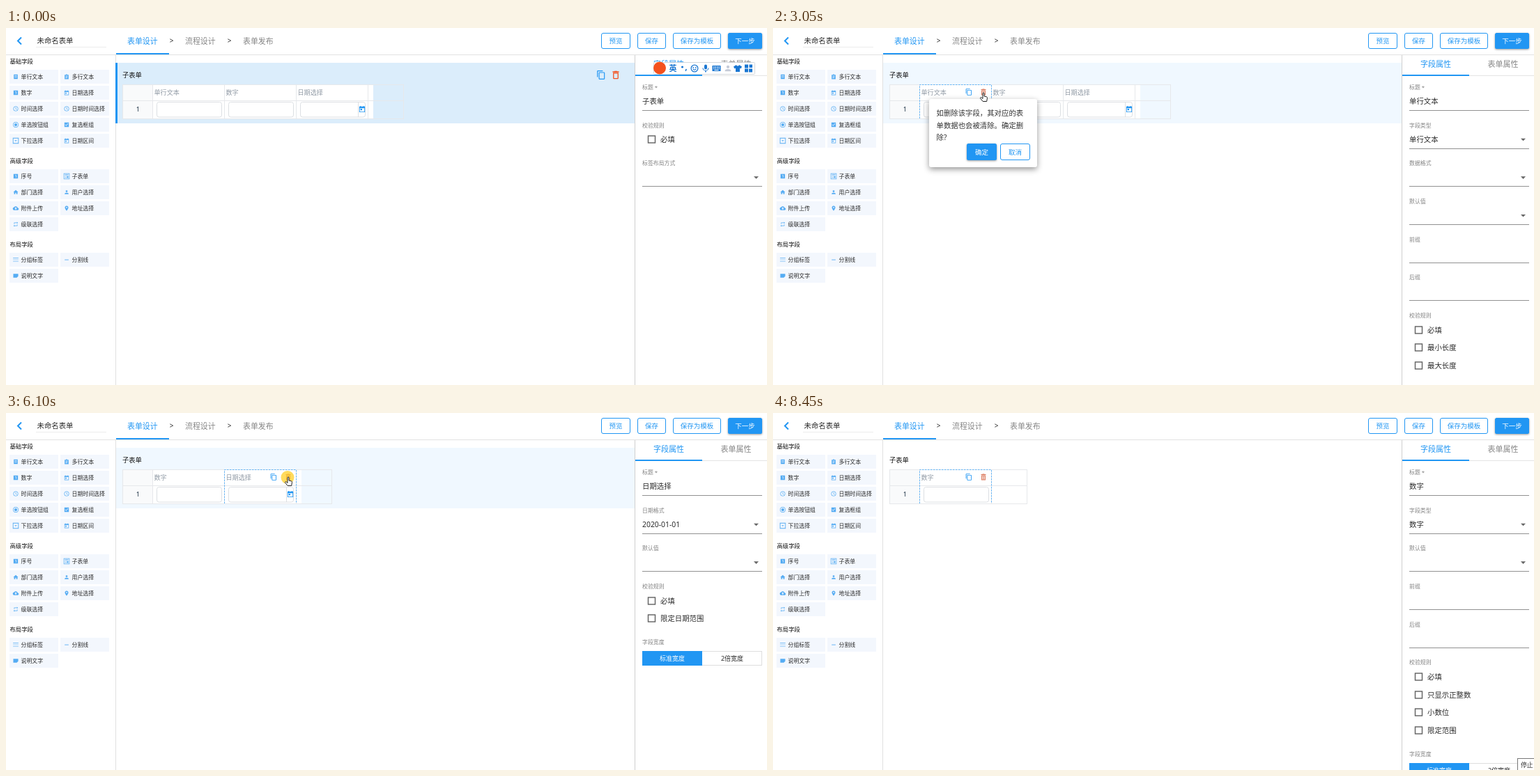
An HTML page with a canvas for the animation above (8580 ms loop, 1092 by 513 pixels).

```html
<!DOCTYPE html>
<html lang="zh-CN">
<head>
<meta charset="utf-8">
<title>表单设计</title>
<style>
html, body { margin: 0; width: 100%; height: 100%; overflow: hidden; background: #fff; }
canvas { display: block; }
</style>
</head>
<body>
<canvas id="stage" width="1092" height="513"></canvas>
<script>
const g = document.getElementById('stage').getContext('2d');
const LOOP = 8580, BLUE = '#2196f3', INK = '#2b2b2b', GREY = '#858585', LINE = '#e6e8eb';

// Icons on a 24 unit grid, filled even-odd
const ICONS = {
  text: 'M4 3h16v18H4zM7 7h10v2H7zM7 12h10v2H7z',
  lines: 'M4 4h5l1-2h4l1 2h5v18H4zM8 8h8v2H8zM8 12h8v2H8zM8 16h5v2H8z',
  one: 'M3 3h18v18H3zM10 7h4v10h-2V9h-2z',
  date: 'M19 4h-1V2h-2v2H8V2H6v2H3v18h18V4zM19 20H5V9h14zM7 11h5v5H7z',
  clock: 'M12 2a10 10 0 1 0 0 20a10 10 0 1 0 0-20zM12 4a8 8 0 1 1 0 16a8 8 0 1 1 0-16zM11 7h2v5l4 2.5-1 1.5-5-3z',
  radio: 'M12 1a11 11 0 1 0 0 22a11 11 0 1 0 0-22zM12 3a9 9 0 1 1 0 18a9 9 0 1 1 0-18zM12 6a6 6 0 1 0 0 12a6 6 0 1 0 0-12z',
  check: 'M3 3h18v18H3zM10 17l-5-5 1.4-1.4L10 14.2l7.6-7.6L19 8z',
  drop: 'M0 0h24v24H0zM2.500 2.500v19h19v-19zM7 10l5 5 5-5z',
  form: 'M0 0h24v24H0zM2 2v20h20V2zM5 5h14v3H5zM5 11h6v2H5zM13 11h6v8h-6zM5 16h6v2H5z',
  home: 'M10 20v-6h4v6h5v-8h3L12 3 2 12h3v8z',
  user: 'M12 4a4 4 0 1 0 0 8a4 4 0 1 0 0-8zM12 14c-2.700 0-8 1.300-8 4v2h16v-2c0-2.700-5.300-4-8-4z',
  cloud: 'M19.300 10C18.700 6.600 15.600 4 12 4 9 4 6.600 5.600 5.300 8 2.300 8.400 0 11 0 14c0 3.300 2.700 6 6 6h13c2.800 0 5-2.200 5-5s-2-4.800-4.700-5zM14 13v4h-4v-4H7l5-5 5 5z',
  pin: 'M12 2C8 2 5 5 5 9c0 5.300 7 13 7 13s7-7.700 7-13c0-4-3-7-7-7zM12 6.500a2.500 2.500 0 1 1 0 5a2.500 2.500 0 1 1 0-5z',
  cycle: 'M7 7h10v3l4-4-4-4v3H5v6h2zM17 17H7v-3l-4 4 4 4v-3h12v-6h-2z',
  bars: 'M1 4h22v2H1zM1 11h22v2H1zM1 18h22v2H1z',
  dash: 'M4 11h16v2.500H4z',
  note: 'M2 4h20v10l-6 6H2z',
  copy: 'M16 1H4c-1 0-2 1-2 2v14h2V3h12zM19 5H8c-1 0-2 1-2 2v14c0 1 1 2 2 2h11c1 0 2-1 2-2V7c0-1-1-2-2-2zM19 21H8V7h11z',
  bin: 'M6 19c0 1 1 2 2 2h8c1 0 2-1 2-2V7H6zM8 9h8v10H8zM15.500 4l-1-1h-5l-1 1H5v2h14V4z',
  binBars: 'M6 7h12v14H6zM8 9v10h1.500V9zM11.200 9v10h1.600V9zM14.500 9v10H16V9zM15.500 4l-1-1h-5l-1 1H5v2h14V4z',
  smile: 'M12 1a11 11 0 1 0 0 22a11 11 0 1 0 0-22zM12 3.500a8.500 8.500 0 1 1 0 17a8.500 8.500 0 1 1 0-17zM7 8h3v3H7zM14 8h3v3h-3zM6.500 13c2 6 9 6 11 0l-2 0c-1.500 3-5.500 3-7 0z',
  mic: 'M12 1c-2 0-4 1.500-4 4v6c0 5 8 5 8 0V5c0-2.500-2-4-4-4zM19 11c0 9-14 9-14 0H3c0 4 3 7 7.500 8v4h3v-4c4.500-1 7.500-4 7.500-8z',
  keys: 'M0 4h24v16H0zM3 7v3h3V7zM8 7v3h3V7zM13 7v3h3V7zM18 7v3h3V7zM3 12v2h3v-2zM8 12v2h3v-2zM13 12v2h3v-2zM18 12v2h3v-2zM6 16v2h12v-2z',
  shirt: 'M8 2L0 7l3 6 3-2v11h12V11l3 2 3-6-8-5c-1 4-7 4-8 0z',
  grid: 'M1 1h10v10H1zM14 1h9v9h-9zM1 13h10v10H1zM13 13h10v10H13z'
};
for (const k in ICONS) ICONS[k] = new Path2D(ICONS[k]);

const ARROW = new Path2D('M0 0V10.500L2.500 8.300 4.200 12 5.900 11.200 4.200 7.600H7.500z');
const HAND = new Path2D('M-1 1C-1-.4 1-.4 1 1V5L4.300 5.800C5.400 6.100 5.600 7 5.400 8L4.700 12.500H-.8L-4.300 8.300C-5 7-3.800 6.200-2.800 7L-1 8.500z');

// Sidebar: heading, its y, then icon and label pairs in two columns
const GROUPS = [
  ['基础字段', 48, 'text 单行文本 lines 多行文本 one 数字 date 日期选择 clock 时间选择 clock 日期时间选择 radio 单选按钮组 check 复选框组 drop 下拉选择 date 日期区间'],
  ['高级字段', 190.5, 'one 序号 form 子表单 home 部门选择 user 用户选择 cloud 附件上传 pin 地址选择 cycle 级联选择'],
  ['布局字段', 310.5, 'bars 分组标签 dash 分割线 note 说明文字']
];

// Property panels: [label, kind, value]
const WIDTH = ['字段宽度', 'width'], PRE = ['前缀', 'input'], SUF = ['后缀', 'input'], DEF = ['默认值', 'select'];
const rules = (...names) => ['校验规则', 'checks', ['必填', ...names]];
const title = name => ['标题 *', 'input', name];
const PANELS = {
  sub: [title('子表单'), rules(), ['标签布局方式', 'select']],
  text: [title('单行文本'), ['字段类型', 'select', '单行文本'], ['数据格式', 'select'], DEF, PRE, SUF, rules('最小长度', '最大长度')],
  num: [title('数字'), ['字段类型', 'select', '数字'], DEF, PRE, SUF, rules('只显示正整数', '小数位', '限定范围'), WIDTH],
  date: [title('日期选择'), ['日期格式', 'select', '2020-01-01'], DEF, rules('限定日期范围'), WIDTH]
};

// Pointer stops: time, x, y
const STOPS = [
  [170, 1086, 505], [1020, 255, 95], [1090, 257, 95], [1400, 257, 95], [2100, 287, 94],
  [2190, 288, 94], [2520, 302, 93], [3130, 302, 93], [3760, 316, 176], [3910, 308, 172],
  [4690, 308, 172], [5080, 346, 97], [5320, 346, 97], [6020, 405, 92], [6180, 405, 92],
  [6890, 404, 180], [7120, 404, 180], [7200, 407, 177], [7600, 407, 177], [8070, 1094, 514]
];
const CLICKS = [1400, 2960, 4140, 5240, 6100, 7350];

const within = (v, a, b) => v >= a && v < b;

function pointer(t) {
  const i = STOPS.findIndex(s => s[0] > t);
  if (i < 1) return null;
  const [t0, x0, y0] = STOPS[i - 1], [t1, x1, y1] = STOPS[i];
  const p = (t - t0) / (t1 - t0), e = p * p * (3 - 2 * p);
  return { x: x0 + (x1 - x0) * e, y: y0 + (y1 - y0) * e };
}

function box(x, y, w, h, fill) {
  g.fillStyle = fill;
  g.fillRect(x, y, w, h);
}

function round(x, y, w, h, r, fill, stroke) {
  g.beginPath();
  g.roundRect(x, y, w, h, r);
  if (fill) { g.fillStyle = fill; g.fill(); }
  if (stroke) { g.strokeStyle = stroke; g.lineWidth = 1; g.stroke(); }
}

function disc(x, y, r, fill) {
  g.fillStyle = fill;
  g.beginPath();
  g.arc(x, y, r, 0, 7);
  g.fill();
}

function shadowed(alpha, blur, dy, draw) {
  g.save();
  g.shadowColor = `rgba(0,0,0,${alpha})`;
  g.shadowBlur = blur;
  g.shadowOffsetY = dy;
  draw();
  g.restore();
}

function say(s, x, y, size, color = INK, align = 'left', weight = 400) {
  g.font = `${weight} ${size}px "Noto Sans", "Noto Sans CJK SC", "Noto Sans CJK", sans-serif`;
  g.textAlign = align;
  g.fillStyle = color;
  g.fillText(s, x, y + size * .37);
}

function icon(name, x, y, size, color) {
  g.save();
  g.translate(x - size / 2, y - size / 2);
  g.scale(size / 24, size / 24);
  g.fillStyle = color;
  g.fill(ICONS[name], 'evenodd');
  g.restore();
}

function button(s, x, y, w, h, filled, lift = 3) {
  if (filled) shadowed(.4, lift, 1, () => round(x, y, w, h, 2.5, BLUE));
  else round(x + .5, y + .5, w - 1, h - 1, 2.5, '#fff', BLUE);
  say(s, x + w / 2, y + h / 2, 9.5, filled ? '#fff' : BLUE, 'center', filled ? 500 : 400);
}

function header() {
  box(0, 38, 1092, 1, '#e2e2e2');
  g.strokeStyle = BLUE;
  g.lineWidth = 2;
  g.stroke(new Path2D('M22 13.500L17 18.500 22 23.500'));
  say('未命名表单', 44.5, 18, 10.4);
  box(43, 27, 101, 1, '#ececec');
  say('表单设计', 174, 18.5, 10.9, BLUE);
  box(158, 36, 76, 2, BLUE);
  say('>', 237.5, 18.5, 10, INK, 'center');
  say('流程设计', 257, 18.5, 10.9, GREY);
  say('>', 320.5, 18.5, 10, INK, 'center');
  say('表单发布', 340, 18.5, 10.9, GREY);
  button('预览', 854, 7, 42, 23);
  button('保存', 906, 7, 41, 23);
  button('保存为模板', 957, 7, 69, 23);
  button('下一步', 1036, 7, 49, 23, true);
}

function sidebar() {
  box(157, 39, 1, 474, '#e0e0e0');
  for (const [name, y, list] of GROUPS) {
    say(name, 5.5, y, 8.4, '#111');
    const parts = list.split(' ');
    for (let i = 0; i < parts.length / 2; i++) {
      const x = i % 2 ? 78 : 5, cy = Math.round(y + 22.3 + 23 * (i >> 1));
      box(x, cy - 10, 70, 20, '#f3f7fd');
      icon(parts[2 * i], x + 9, cy, 8.5, '#55acf3');
      say(parts[2 * i + 1], x + 16.5, cy, 7.9);
    }
  }
}

function table(names, sel, hover) {
  const end = 211 + 103 * names.length;
  box(167, 81, end - 116 - 44, 49, '#fff');
  box(167, 81, 44, 49, '#f9fafb');
  for (const y of [81, 104, 130]) box(167, y, end + 51 - 167, 1, LINE);
  for (const x of [167, 210, end + 50]) box(x, 81, 1, 50, LINE);
  say('1', 189.5, 117, 9.2, '#1f3346', 'center');
  names.forEach((name, i) => {
    const x = 211 + 103 * i;
    box(x + 102, 81, 1, 50, LINE);
    say(name, x + 1.5, 93, 9.1, '#909aa5');
    round(x + 5.5, 106.5, 93, 21.5, 3, '#fff', '#dcdfe3');
    if (name === '日期选择') {
      box(x + 88, 107, 1, 21, '#dcdfe3');
      icon('date', x + 94, 116.5, 11, BLUE);
    }
    if (i === sel || i === hover) {
      g.save();
      g.setLineDash([2.5, 1.5]);
      g.strokeStyle = '#64b5f6';
      g.lineWidth = 1;
      g.stroke(new Path2D(`M${x - .5} 130V81.500H${x + 102.5}V130`));
      g.restore();
    }
    if (i === sel) {
      icon('copy', x + 70, 92, 10.5, BLUE);
      icon('binBars', x + 91, 92, 12, '#dc7b5e');
    }
  });
}

function panel(rows) {
  box(902, 39, 1, 474, '#cfcfcf');
  say('字段属性', 951, 52, 11, BLUE, 'center');
  say('表单属性', 1047.5, 52, 11, GREY, 'center');
  box(903, 68, 189, 1, '#e4e4e4');
  box(903, 67, 96, 2, BLUE);
  let y = 85;
  for (const [label, kind, value] of rows) {
    say(label, 913, y, 7.9, GREY);
    if (kind === 'checks') {
      value.forEach((name, i) => {
        const cy = y + 20.8 + 25.7 * i;
        g.strokeStyle = '#606060';
        g.lineWidth = 1.4;
        g.strokeRect(921.5, Math.round(cy) - 5, 10, 10);
        say(name, 939, cy, 10.4);
      });
      y += 54.6 + 25.7 * (value.length - 1);
    } else if (kind === 'width') {
      const top = Math.round(y + 12.6);
      g.strokeStyle = '#dedede';
      g.lineWidth = 1;
      g.strokeRect(913.5, top + .5, 171, 20);
      box(913, top, 86, 21, BLUE);
      say('标准宽度', 956, top + 10.5, 9, '#fff', 'center');
      say('2倍宽度', 1042, top + 10.5, 9, INK, 'center');
    } else {
      if (value) say(value, 913, y + 20.5, 10.4);
      box(913, Math.round(y + 33), 172, 1, '#919191');
      if (kind === 'select') {
        g.fillStyle = '#666';
        g.fill(new Path2D(`M1073 ${y + 19}h7l-3.500 3.600z`));
      }
      y += 54.65;
    }
  }
}

function inputBar() {
  round(929.5, 49.5, 145, 17, 1, '#fff', '#d4d8dc');
  disc(938, 57.5, 9, '#f4511e');
  const ink = '#1976d2';
  say('英', 957, 58, 11, ink, 'center', 700);
  disc(970.5, 56, 1.6, ink);
  say(',', 976, 56, 12, ink, 'center', 700);
  ['smile', 'mic', 'keys', 'user', 'shirt', 'grid'].forEach((name, i) =>
    icon(name, [988, 1004, 1019.5, 1036, 1050, 1065.5][i], 58, i === 3 ? 13 : 12, i === 3 ? '#c5cbd8' : ink));
}

function popup(x, pressed, at) {
  shadowed(.42, 8, 3, () => round(x, 102, 155, 98, 3, '#fff'));
  ['如删除该字段，其对应的表', '单数据也会被清除。确定删', '除?'].forEach((s, i) =>
    say(s, x + 10.5, 122 + 17.8 * i, 10.4, '#333'));
  const over = at && within(at.x, x + 54, x + 97) && within(at.y, 166, 190);
  button('确定', x + 54, 166, 43, 24, true, over ? 7 : 3);
  button('取消', x + 102, 166, 43, 24);
  if (pressed) disc(at.x - .5, at.y, 10, 'rgba(255,255,255,.25)');
}

function draw(t) {
  const at = pointer(t);
  const names = ['单行文本', '数字', '日期选择'];
  if (t >= 4310) names.shift();
  if (t >= 7600) names.pop();
  const fresh = t < 1480;
  const mode = fresh ? 'sub' : t < 4310 ? 'text' : within(t, 5400, 7600) ? 'date' : 'num';
  const sel = fresh ? -1 : mode === 'date' ? 1 : 0;
  const popX = within(t, 3050, 4310) ? 224 : within(t, 6180, 7600) ? 327 : 0;
  const onPopup = popX && at && at.y >= 102;
  const onForm = at && !onPopup && within(at.x, 157, 902) && within(at.y, 50, 137);
  const hover = onForm && within(at.y, 81, 130) ? Math.floor((at.x - 211) / 103) : -1;

  box(0, 0, 1092, 513, '#fff');
  if (fresh || onForm) box(157, 50, 745, 87, fresh ? '#dbedfb' : '#f0f8ff');
  sidebar();
  header();
  if (fresh) {
    box(157, 50, 3, 87, BLUE);
    icon('copy', 854, 67.5, 14, BLUE);
    icon('bin', 875, 67.5, 15.5, '#f4511e');
  }
  say('子表单', 167, 67.5, 9.3, '#111', 'left', 500);
  table(names, sel, hover);
  panel(PANELS[mode]);
  if (fresh) inputBar();
  if (popX) popup(popX, within(t, 4220, 4310) || within(t, 7440, 7600), at);

  if (at) {
    if (CLICKS.some(c => within(t, c, c + 85))) disc(at.x - 1, at.y + .5, 9.5, 'rgba(255,205,30,.72)');
    const x = 211 + 103 * sel;
    const onIcon = sel >= 0 && [70, 91].some(d => Math.hypot(at.x - x - d, at.y - 92) < 8);
    const shape = onIcon ? HAND : ARROW;
    g.save();
    g.translate(at.x, at.y);
    g.fillStyle = '#fff';
    g.strokeStyle = '#222';
    g.lineWidth = 1;
    g.fill(shape);
    g.stroke(shape);
    g.restore();
  }
  if (t >= 8320) {
    g.strokeStyle = '#777';
    g.lineWidth = 1;
    box(1068, 496, 24, 17, '#fff');
    g.strokeRect(1068.5, 496.5, 40, 30);
    say('停止', 1073, 505.5, 8.8, '#333');
  }
}

function tick(now) {
  draw(now % LOOP);
  requestAnimationFrame(tick);
}
draw(0);
requestAnimationFrame(tick);
</script>
</body>
</html>
```
